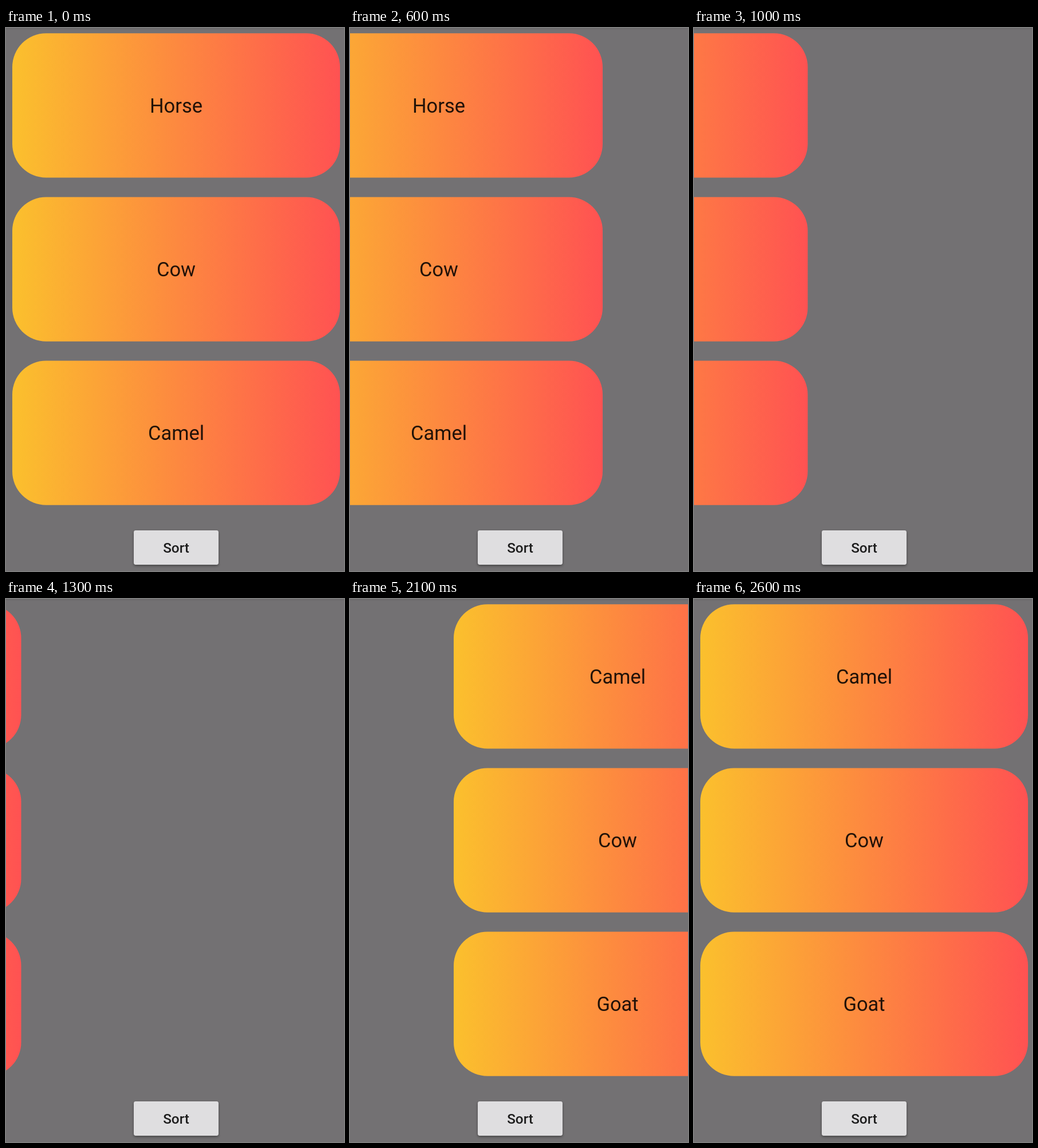
An HTML page with a canvas that plays this animation: 590 px wide and 949 px high, repeating every 2700 ms.

```html
<!DOCTYPE html>
<html lang="en">
<head>
<meta charset="utf-8">
<title>Sort cards</title>
<style>
  html, body { margin: 0; width: 100%; height: 100%; overflow: hidden; background: #737173; }
  canvas { display: block; }
</style>
</head>
<body>
<canvas id="stage" width="590" height="949"></canvas>
<script>
const ctx = document.getElementById('stage').getContext('2d');
const WIDTH = 590, HEIGHT = 949;
const LOOP = 2700, STEP = 100, SWAP = 1360;
const CARD = { x: 11, y: 9.3, w: 572, h: 252.3, r: 59, pitch: 286.1 };
const UNSORTED = ['Horse', 'Cow', 'Camel'];
const SORTED = ['Camel', 'Cow', 'Goat'];

// Time in ms and horizontal offset; the cards leave left, then return from the right.
const LEAVE = [[355, 0], [600, -142], [1000, -384.5], [1300, -556.5], [1357, -WIDTH]];
const ENTER = [[1383, WIDTH], [1700, 403.5], [2100, 170], [2388, 0]];

function offsetAt(path, t) {
  if (t <= path[0][0]) return path[0][1];
  for (let i = 1; i < path.length; i++) {
    const [t0, x0] = path[i - 1], [t1, x1] = path[i];
    if (t < t1) return x0 + (x1 - x0) * (t - t0) / (t1 - t0);
  }
  return path[path.length - 1][1];
}

function roundRect(x, y, w, h, r, fill) {
  ctx.fillStyle = fill;
  ctx.beginPath();
  ctx.roundRect(x, y, w, h, r);
  ctx.fill();
}

function label(text, x, y, font) {
  ctx.font = font + ' Roboto, sans-serif';
  ctx.textAlign = 'center';
  ctx.fillStyle = 'rgba(0, 0, 0, 0.87)';
  ctx.fillText(text, x, y);
}

function drawBackground() {
  ctx.fillStyle = '#737173';
  ctx.fillRect(0, 0, WIDTH, HEIGHT);
  const shade = ctx.createLinearGradient(0, 0, 0, 4);
  shade.addColorStop(0, 'rgba(0, 0, 0, 0.08)');
  shade.addColorStop(1, 'rgba(0, 0, 0, 0)');
  ctx.fillStyle = shade;
  ctx.fillRect(0, 0, WIDTH, 4);
}

function drawCard(text, row, offset) {
  const x = CARD.x + offset, y = CARD.y + row * CARD.pitch;
  const fill = ctx.createLinearGradient(x, 0, x + CARD.w, 0);
  fill.addColorStop(0, '#fbc02d');
  fill.addColorStop(1, '#ff5252');
  roundRect(x, y, CARD.w, CARD.h, CARD.r, fill);
  label(text, x + CARD.w / 2, y + 138.7, '400 34.5px');
}

function drawButton() {
  ctx.save();
  ctx.shadowColor = 'rgba(0, 0, 0, 0.4)';
  ctx.shadowBlur = 4;
  ctx.shadowOffsetY = 2;
  roundRect(223, 878, 148, 60, 3.4, '#dfdee0');
  ctx.restore();
  label('Sort', 297, 917, '500 24.3px');
}

function draw(t) {
  const leaving = t < SWAP;
  const names = leaving ? UNSORTED : SORTED;
  const offset = offsetAt(leaving ? LEAVE : ENTER, t);
  drawBackground();
  names.forEach((name, row) => drawCard(name, row, offset));
  drawButton();
}

// The motion advances ten times a second.
function tick() {
  draw(Math.floor(performance.now() % LOOP / STEP) * STEP);
  requestAnimationFrame(tick);
}
tick();
</script>
</body>
</html>
```
